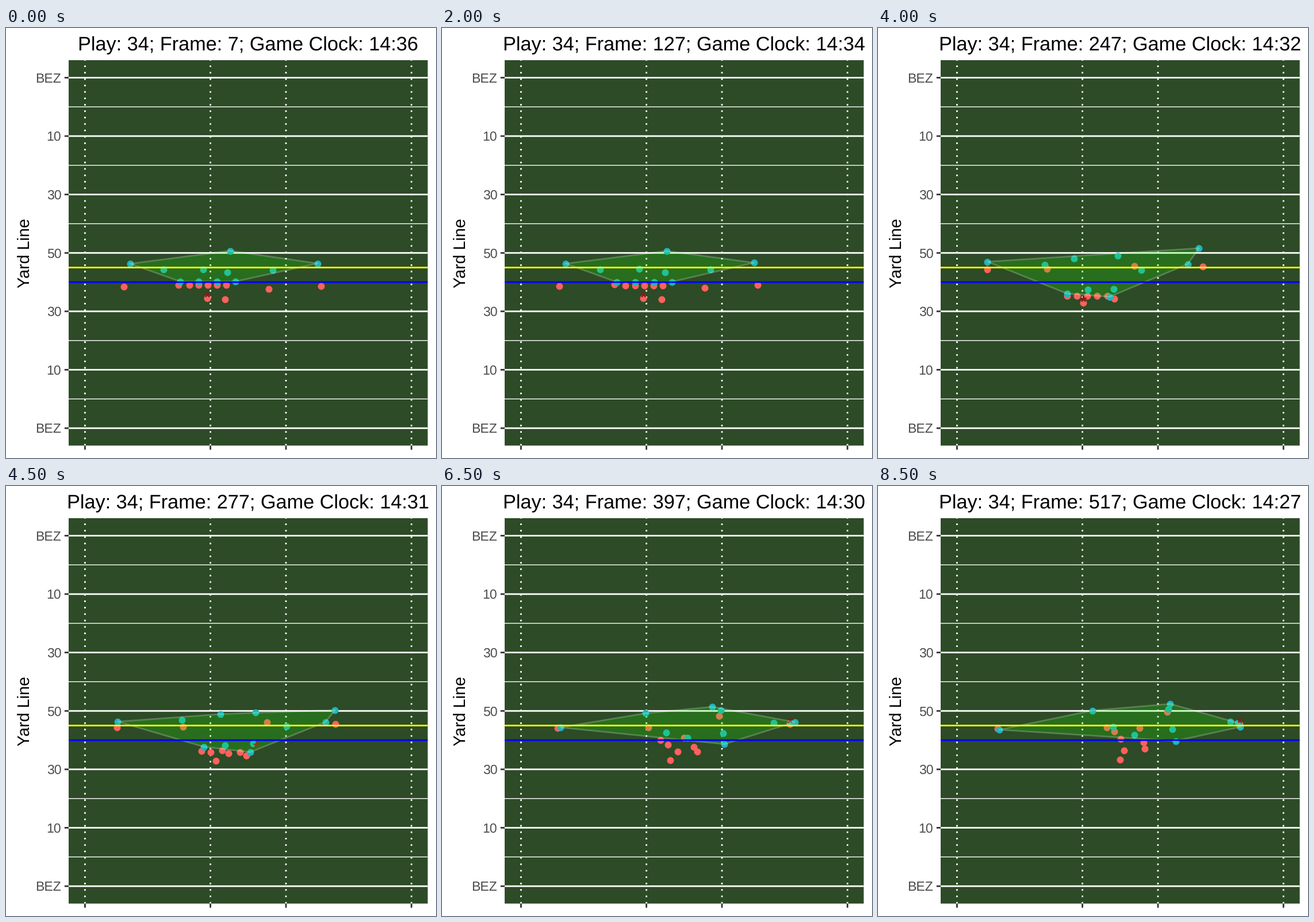
A matplotlib script that plays this animation: 748 px wide and 748 px high, repeating every 9000 ms.

```python
import numpy as np
import matplotlib.pyplot as plt
from matplotlib.animation import FuncAnimation
from matplotlib.patches import Polygon, Rectangle

SIZE, DPI = 748, 100
PT = 72 / DPI
STEPS, STEP_MS = 18, 500
LEFT, RIGHT, TOP, BOTTOM = 109, 733.6, 56, 726.4
MIDDLE = (LEFT + RIGHT) / 2
LINE_PX = 2.79
MAJOR = LINE_PX * PT
TICK = 7.2
RED, TEAL = "#ff615c", "#1fb4be"

plt.rcParams.update({
    "font.family": "Liberation Sans",
    "text.hinting": "none",
    "path.snap": False,
})

# The play: set until the snap, first moves until the throw, then the chase
SNAP, THROW, CATCH, END = 3.5, 8, 11, 17

# Each route: where the runner lines up, is at the throw, and ends
LINE_ENDS = [(411, 427), (422, 440), (455, 421), (428, 460), (462, 446)]
line = [((319 + 16 * i, 447), (329 + 17.4 * i, 466), end) for i, end in enumerate(LINE_ENDS)]

passer = ((350, 470), (357, 478), (421, 476))
catcher = ((548, 449), (565, 414.5), (629, 413.5))
routes = [
    ((381, 472), (411, 471), (464, 457)),
    ((205, 450), (190.5, 420), (208, 422)),
    ((300, 447), (294, 419), (398, 420)),
    ((457, 454), (446.5, 413.5), (503, 392.5)),
]

RUSH_MOVES = [
    ((329, 462), (409, 418.5)),
    ((365.5, 455), (446, 432.5)),
    ((403, 467.5), (518, 443.5)),
    ((410.5, 453.5), (512.5, 423)),
]
rush = [((303 + 32 * i, 441), *moves) for i, moves in enumerate(RUSH_MOVES)]

coverage = [
    ((216, 410), (190.5, 406.5), (211, 424)),
    ((274, 420), (290, 411.5), (373, 390.5)),
    ((343, 420), (341.5, 401), (508.5, 379)),
    ((390, 387.5), (417.5, 396), (505, 388)),
    ((385, 425), (458.5, 420.5), (613.5, 410)),
    ((464, 420.5), (539, 410.5), (626, 412)),
    ((542, 409.5), (558.5, 383), (630.5, 419)),
]

offence = np.array([passer, catcher] + routes + line, float)
defence = np.array(rush + coverage, float)


def progress(step, start, stop):
    return np.clip((step - start) / (stop - start), 0, 1)


def positions(team, step, pace):
    """Ease into the first move, then slow down over the chase."""
    start, throw, finish = team[:, 0], team[:, 1], team[:, 2]
    go = progress(step, SNAP, THROW) ** 1.4
    chase = 1 - (1 - progress(step, THROW, END)) ** pace
    return start + (throw - start) * go + (finish - throw) * chase


def attack(step):
    return positions(offence, step, 1.2)


def defend(step):
    return positions(defence, step, 1.8)


def ball_at(step):
    """Held by the passer, in the air, then carried by the catcher."""
    hands = attack(min(step, THROW))[0]
    target = attack(max(step, CATCH))[1]
    return hands + (target - hands) * progress(step, THROW, CATCH) - (0, 7)


def half_hull(points):
    chain = []
    for p in points:
        while len(chain) > 1:
            (x0, y0), (x1, y1) = chain[-2:]
            if (x1 - x0) * (p[1] - y0) - (y1 - y0) * (p[0] - x0) > 0:
                break
            chain.pop()
        chain.append(p)
    return chain[:-1]


def hull(points):
    ordered = sorted(map(tuple, points))
    return half_hull(ordered) + half_hull(ordered[::-1])


CLOCK_DROPS = [1, 3, 5, 7, 9, 11, 14, 16, 17]


def title_text(step):
    seconds = 36 - sum(step >= drop for drop in CLOCK_DROPS)
    return f"Play: 34; Frame: {7 + 30 * step}; Game Clock: 14:{seconds}"


fig = plt.figure(figsize=(SIZE / DPI, SIZE / DPI), dpi=DPI, facecolor="white")
ax = fig.add_axes([0, 0, 1, 1])
ax.set_xlim(0, SIZE)
ax.set_ylim(SIZE, 0)
ax.axis("off")


def stroke(xs, ys, color, width=MAJOR, z=2):
    ax.plot(xs, ys, color=color, lw=width, zorder=z, solid_capstyle="butt")


def across(y, color, width=MAJOR, z=2):
    stroke([LEFT, RIGHT], [y, y], color, width, z)


def label(x, y, text, size, color="black", **kw):
    return ax.text(x, y, text, fontsize=size * PT, color=color, va="baseline", **kw)


ax.add_patch(Rectangle((LEFT, TOP), RIGHT - LEFT, BOTTOM - TOP, fc="#2c4b26", lw=0, zorder=1))

GAP = 101.62
for n, name in enumerate(["BEZ", "10", "30", "50", "30", "10", "BEZ"]):
    y = 86.4 + GAP * n
    if n < 6:
        across(y + GAP / 2, "white", MAJOR / 2)
    across(y, "white")
    stroke([LEFT - TICK, LEFT], [y, y], "#333333")
    label(96.3, y + 8.2, name, 23, "#4d4d4d", ha="right")

dot_ends = np.arange(BOTTOM, TOP, -4 * LINE_PX)
for x in (137.4, 355.6, 487, 705.3):
    ax.vlines(np.full(len(dot_ends), x), dot_ends - LINE_PX, dot_ends,
              color="white", lw=MAJOR, zorder=2, capstyle="butt")
    stroke([x, x], [BOTTOM, BOTTOM + TICK], "#333333")

label(40.5, (TOP + BOTTOM) / 2, "Yard Line", 28.7, ha="center", rotation=90,
      rotation_mode="anchor")
title = label(MIDDLE, 39, "", 34.3, ha="center")


def team_dots(team, color):
    return ax.scatter(*team[:, 0].T, s=(12 * PT) ** 2, c=color, linewidths=0, zorder=4)


red_dots = team_dots(offence, RED)
teal_dots = team_dots(defence, TEAL)
ball, = ax.plot([], [], marker=(5, 2, 0), ms=11 * PT, mew=2 * PT, color="#8b1a1a", zorder=5)
cover = Polygon(hull(defence[:, 0]), closed=True, fc=(0.1, 1, 0, 0.2),
                ec=(1, 1, 1, 0.22), lw=MAJOR, joinstyle="round", zorder=6)
ax.add_patch(cover)
across(416.7, "yellow", z=7)
across(442.1, "blue", z=7)


def draw(step):
    defenders = defend(step)
    red_dots.set_offsets(attack(step))
    teal_dots.set_offsets(defenders)
    cover.set_xy(hull(defenders))
    x, y = ball_at(step)
    ball.set_data([x], [y])
    title.set_text(title_text(step))
    return red_dots, teal_dots, cover, ball, title


anim = FuncAnimation(fig, draw, frames=STEPS, interval=STEP_MS, repeat=True, repeat_delay=0)
plt.show()
```
